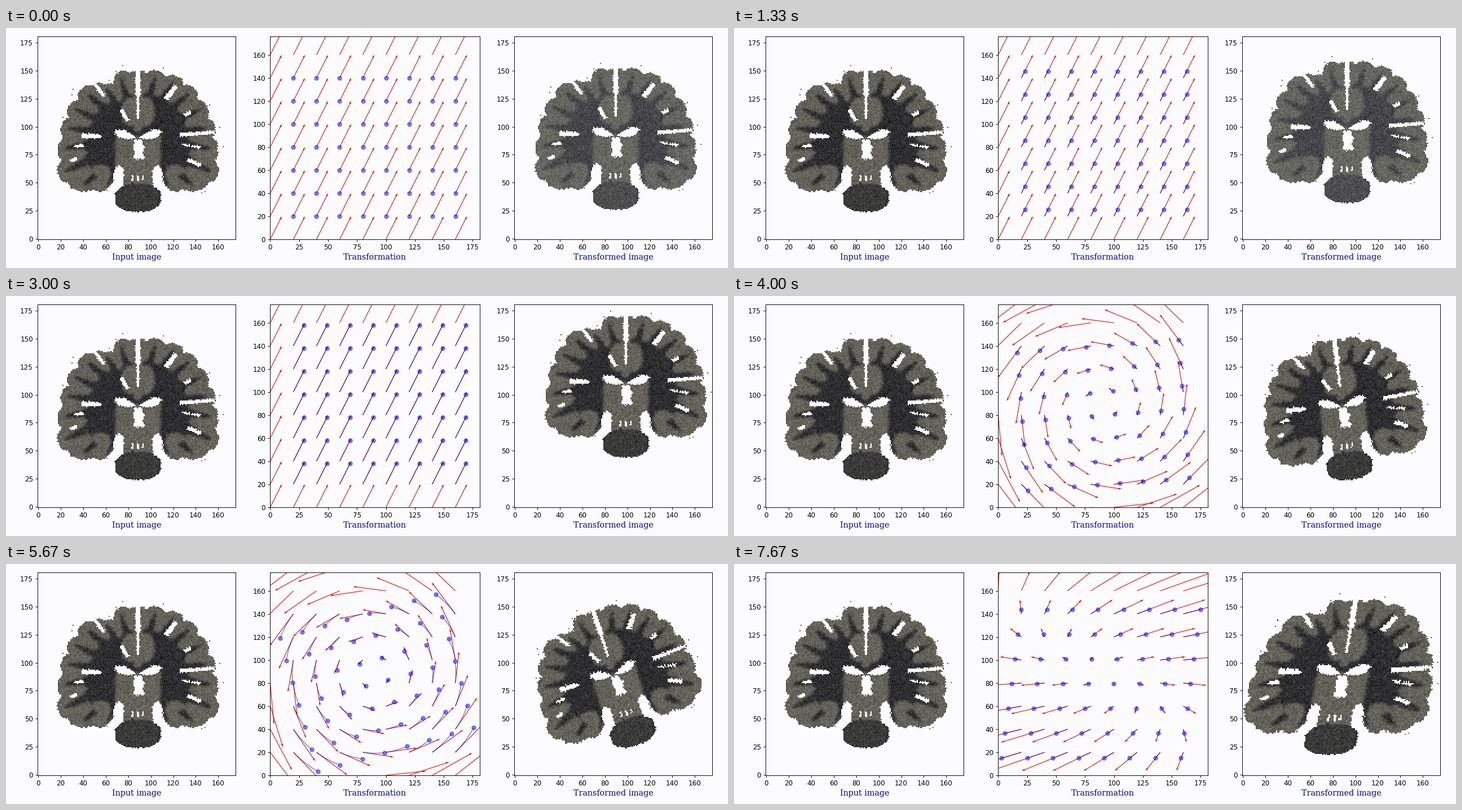
Recreate the animation shown at these times as a matplotlib script. Size 1280x427 px, loop 8000 ms.

```python
import matplotlib.pyplot as plt
import numpy as np
from matplotlib.animation import FuncAnimation
from matplotlib.collections import LineCollection

W, H, DPI = 1280, 427, 1280 / 15
PAPER = "#fcfcfe"
PAPER_RGB = (252, 252, 254)
COLS, ROWS = 176, 181
STEPS, FRAMES, LOOP_MS = 10, 24, 8000

rng = np.random.default_rng(4)
gx, gy = np.meshgrid(np.arange(COLS), np.arange(ROWS))


def soften(mask):
    m = mask.astype(float)
    for axis in (0, 1):
        m = (np.roll(m, 1, axis) + m + np.roll(m, -1, axis)) / 3
    return m


def make_brain():
    """Tissue mask, share of white matter and grain of a coronal slice."""
    x = gx - 88.5 + rng.normal(0, 0.35, gx.shape)
    y = gy - 90 + rng.normal(0, 0.35, gx.shape)
    u = abs(x)
    radius = np.hypot(x, y)
    angle = np.degrees(np.arctan2(x, y))  # from the top, right positive
    turn = abs(angle)

    def ellipse(cu, cy, a, b, power=2):
        return (abs(u - cu) / a) ** power + (abs(y - cy) / b) ** power < 1

    def slit(direction, start, end, half):
        d = np.radians(direction)
        along = x * np.sin(d) + y * np.cos(d)
        across = abs(x * np.cos(d) - y * np.sin(d))
        return (along > start) & (along < end) & (across < half)

    # Hull radius by angle; folds bulge over fingers of white matter
    hull = np.interp(turn, [0, 8, 19, 35, 48, 63, 86, 100, 114, 123, 134, 149, 152, 180],
                     [58, 61.5, 62, 65, 66, 67, 69, 72, 78, 78, 69, 55, 38, 30])
    hull -= 9 * np.exp(-((angle + 29) / 9) ** 2)
    fold = np.cos(2 * np.pi * (turn - 82) / 16.5)
    hull *= 1 - 0.05 * ((1 - fold) / 2) ** 4
    depth = radius / hull

    stem = ellipse(0, -53.5, 20.5, 12.5, 2.4)
    trunk = (u < 13) & (y < -20) & (y > -50)
    cleft = ellipse(17, -35, 5, 10)
    tissue = ((depth < 1) & ~cleft) | stem | trunk

    wing = abs(y + 0.5 - 0.27 * u) < 4 * np.sin(np.pi * (np.minimum(u, 22) / 22) ** 1.3)
    third = (abs(x - 0.7) < 4.4 + 0.8 * np.cos(0.7 * y)) & (y > -19) & (y < -2)
    fissure = (y > 16) & (u < np.where(y > 37, 2.1, 1.2))
    gaps = wing | third | fissure
    for sulcus in [(-39, 47, 75, 1.6), (36, 42, 57, 2.2), (64, 45, 52, 1.6),
                   (-88, 33, 50, 2), (86, 37, 68, 1.6), (99, 40, 56, 0.9),
                   (-98, 49, 58, 1.2), (114, 48, 61, 1.8), (-31, 17, 29, 1.6),
                   (-109, 57, 64, 1.2)]:
        gaps |= slit(*sulcus)
    gaps |= (u < 5.5) & (abs(u % 4 - 0.5) < 0.7) & (abs(y + 36) < 2)
    tissue &= ~gaps
    tissue |= (depth > 1.03) & (depth < 1.1) & (rng.random(gx.shape) < 0.006) & (turn < 155)

    matter = depth < 0.66 + 0.25 * np.maximum(fold, 0) ** 1.3
    grey_core = ((u < 20) & (y < 2)) | ellipse(7, 23, 8, 13) | ellipse(33, -29, 8, 5) | (u < 4)
    callosum = (abs(y - 2.7 - 0.55 * u) < 2.3) & (u < 17)
    matter = (matter & ~grey_core) | callosum
    share = np.where(stem, 0.75, soften(matter))
    return tissue, share, rng.normal(0, 11, gx.shape)


def colour_brain(tissue, matter, grain, pale):
    grey, dark = ((103, 103, 97), (70, 69, 73)) if pale else ((99, 99, 91), (46, 45, 47))
    mix = matter[..., None]
    rgb = np.array(grey) * (1 - mix) + np.array(dark) * mix + grain[..., None]
    rgb[~tissue] = PAPER_RGB
    return rgb.clip(0, 255).astype(np.uint8)


brain = make_brain()
brain_full = colour_brain(*brain, pale=False)
brain_pale = colour_brain(*brain, pale=True)

# Velocity fields as homogeneous generators about the centre
TURN = np.pi / 8
FIELDS = [np.array(m, float) for m in (
    [[0, 0, 10], [0, 0, 20], [0, 0, 0]],
    [[0, -TURN, 0], [TURN, 0, 0], [0, 0, 0]],
    [[0.3365, 0.432, 0], [0, 0.2375, 0], [0, 0, 0]])]
CENTRE = np.array([90.5, 88])


def flow(field, s):
    """Matrix exponential of the field after time s."""
    term = total = np.eye(3)
    for k in range(1, 14):
        term = term @ field * (s / k)
        total = total + term
    return total


def apply(matrix, points):
    return (points - CENTRE) @ matrix[:2, :2].T + matrix[:2, 2]


def move(field, s, points):
    return apply(flow(field, s), points) + CENTRE


def warp(image, field, s):
    cells = np.column_stack([gx.ravel(), gy.ravel()])
    x, y = np.rint(move(field, -s, cells)).astype(int).T
    ok = (x >= 0) & (x < COLS) & (y >= 0) & (y < ROWS)
    out = np.full((ROWS * COLS, 3), PAPER_RGB, np.uint8)
    out[ok] = image[y[ok], x[ok]]
    return out.reshape(ROWS, COLS, 3)


def lattice(xs, ys):
    return np.array([(x, y) for y in ys for x in xs], float)


arrow_base = lattice(range(0, 161, 20), range(0, 181, 20))
dot_base = lattice(range(20, 161, 20), range(20, 141, 20))

fig = plt.figure(figsize=((W + 1e-6) / DPI, (H + 1e-6) / DPI), dpi=DPI, facecolor=PAPER)


def panel(left, width, label, xticks, yticks):
    ax = fig.add_axes([left / W, 51 / H, width / W, 361 / H], facecolor=PAPER)
    ax.set_xlabel(label, family="DejaVu Serif", color="darkblue", size=12, labelpad=3)
    ax.tick_params(labelfontfamily="DejaVu Sans", labelsize=10)
    ax.set_xticks(xticks)
    ax.set_yticks(yticks)
    return ax


by20, by25 = range(0, 161, 20), range(0, 176, 25)
ax_in = panel(56.2, 351, "Input image", by20, by25)
ax_field = panel(468.4, 371.3, "Transformation", by25, by20)
ax_out = panel(901.2, 351, "Transformed image", by20, by25)

show = dict(origin="lower", interpolation="nearest", aspect="auto")
ax_in.imshow(brain_full, **show)
warped = ax_out.imshow(brain_full, **show)

ax_field.set_xlim(0, ROWS)
ax_field.set_ylim(0, COLS)
arrows = ax_field.quiver(*arrow_base.T, *np.ones_like(arrow_base).T, color="#e8100c",
                         units="xy", angles="xy", scale_units="xy", scale=1, width=0.56)
trails = LineCollection([], colors=[(0, 0, 0.72)], alpha=0.65, linewidths=0.9, zorder=2)
ax_field.add_collection(trails, autolim=False)
dots, = ax_field.plot([], [], "bo", alpha=0.5, markersize=6, zorder=3)


def update(i):
    phase, step = divmod(i, STEPS)
    field = FIELDS[phase]
    arrows.set_UVC(*apply(field, arrow_base).T)
    path = np.array([move(field, k / STEPS, dot_base) for k in range(step + 1)])
    trails.set_segments(list(path.transpose(1, 0, 2)) if step else [])
    dots.set_data(*path[-1].T)
    # The shifted image stays paler until it nears its end position
    pale = phase == 0 and step < 7
    warped.set_data(warp(brain_pale if pale else brain_full, field, (step + 1) / STEPS))
    return arrows, trails, dots, warped


anim = FuncAnimation(fig, update, frames=FRAMES, interval=LOOP_MS / FRAMES,
                     repeat=True, repeat_delay=0, blit=False)
plt.show()
```
